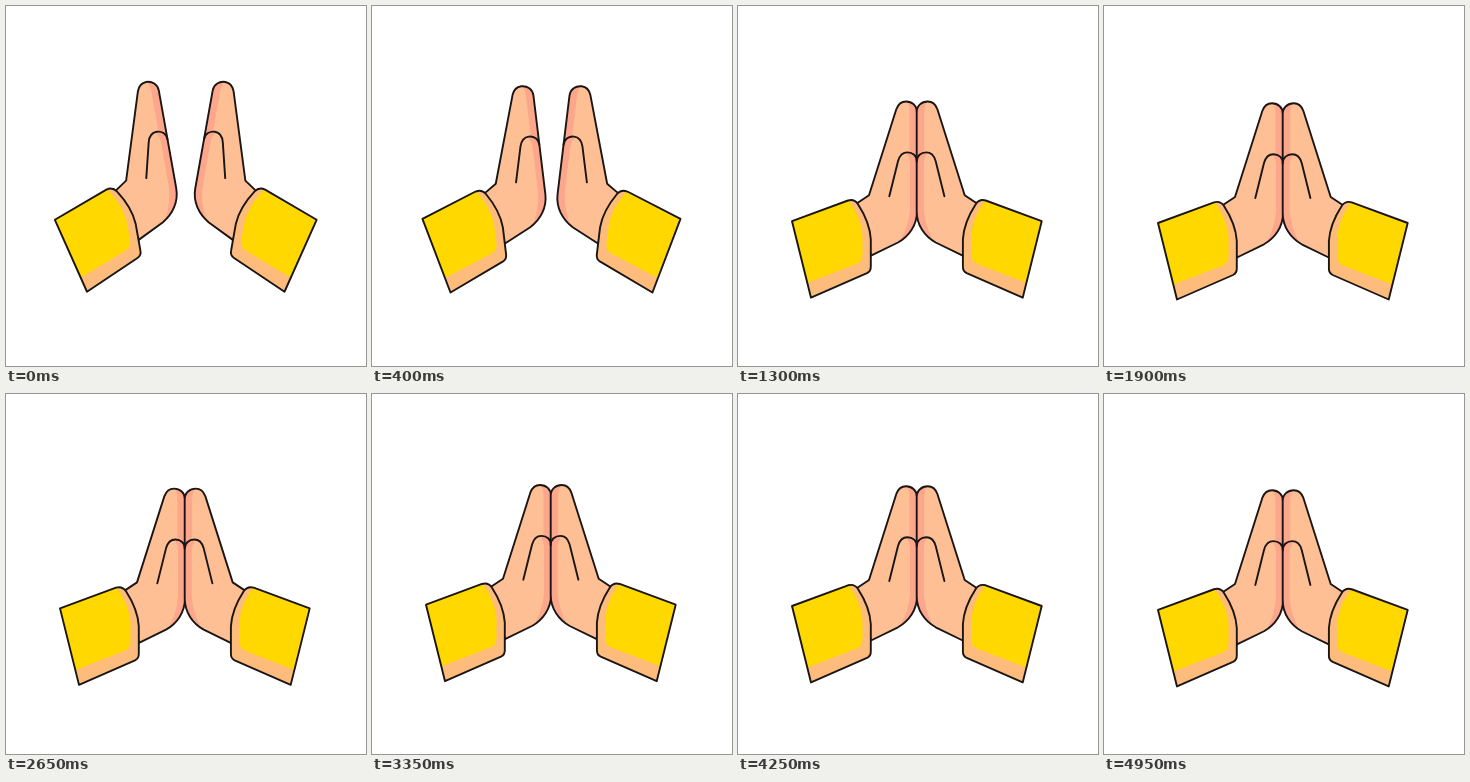
Recreate the animation shown at these times as an HTML page. Size 360 by 360 pixels, loop 5000 ms.

```html
<!DOCTYPE html>
<html lang="en">
<head>
<meta charset="utf-8">
<title>Joining hands</title>
<style>
  html, body { margin: 0; width: 100%; height: 100%; overflow: hidden; background: #fff; }
  svg { display: block; width: 100%; height: 100%; }
  .line { fill: none; stroke: #1b1515; stroke-width: 1.9; stroke-linecap: round; stroke-linejoin: round; }
</style>
</head>
<body>
<svg viewBox="0 0 360 360">
  <defs>
    <path id="palm" d="M119 199 L131 191 L158.3 105 C160.500 99 164 97.300 168 97.300 C174 97.300 179 101.500 179 108 V207 C179 221 171 232 160 238.300 L133 251.500 Z"/>
    <path id="cuff" d="M54 217 L110 196.300 Q116.500 194.500 120 200 C126.500 210 132 222 132.800 235 V262 Q133 267 129 269 L73 293.500 Z"/>
    <clipPath id="inPalm"><use href="#palm"/></clipPath>
    <clipPath id="inCuff"><use href="#cuff"/></clipPath>
    <g id="hand">
      <use href="#palm" fill="#fdbf93"/>
      <g clip-path="url(#inPalm)" fill="#fca68c">
        <path d="M168 96 Q171.500 100 171.500 108 V149 Q176 149 181 156 V96 Z"/>
        <path d="M168 148 Q172 153 172 160 V204 Q171.500 220 162 238 L181 230 V148 Z"/>
      </g>
      <use href="#palm" class="line"/>
      <path class="line" d="M151.300 192 L160 157 C161.800 150.500 165.500 148.200 169.500 148.200 C174.500 148.200 179 151.500 179 157.500"/>
      <use href="#cuff" fill="#fdbb7c"/>
      <path clip-path="url(#inCuff)" fill="#ffd800" d="M50 217 L109 194 C116 203 123.700 217 124.500 232 V250 Q124.500 257 119 259.500 L66 279.800 Z"/>
      <use href="#cuff" class="line"/>
    </g>
  </defs>
  <g id="pair">
    <use id="left" href="#hand"/>
    <use id="right" href="#hand"/>
  </g>
</svg>
<script>
  const LOOP = 5000, STEP = 50, JOIN = 1050;
  const BOB_PERIOD = 3500, BOB_LOW = 1900, BOB_SIZE = 3.4;
  const OPEN_ANGLE = -10.1, OPEN_SHIFT = 1.8, MIRROR = 357.7;
  const place = (id, transform) => document.getElementById(id).setAttribute('transform', transform);

  function draw(now) {
    const t = Math.floor((now % LOOP) / STEP) * STEP;
    const open = (1 + Math.cos(Math.PI * Math.min(t / JOIN, 1))) / 2;
    const bob = BOB_SIZE * (Math.cos(2 * Math.PI * (t - BOB_LOW) / BOB_PERIOD) - 1);
    const turn = `rotate(${OPEN_ANGLE * open} 71 247.7)`;
    place('pair', `translate(0 ${bob})`);
    place('left', turn);
    place('right', `translate(${MIRROR + OPEN_SHIFT * open}) scale(-1 1) ${turn}`);
  }

  const start = performance.now();
  function tick() {
    draw(performance.now() - start);
    requestAnimationFrame(tick);
  }
  tick();
</script>
</body>
</html>
```
